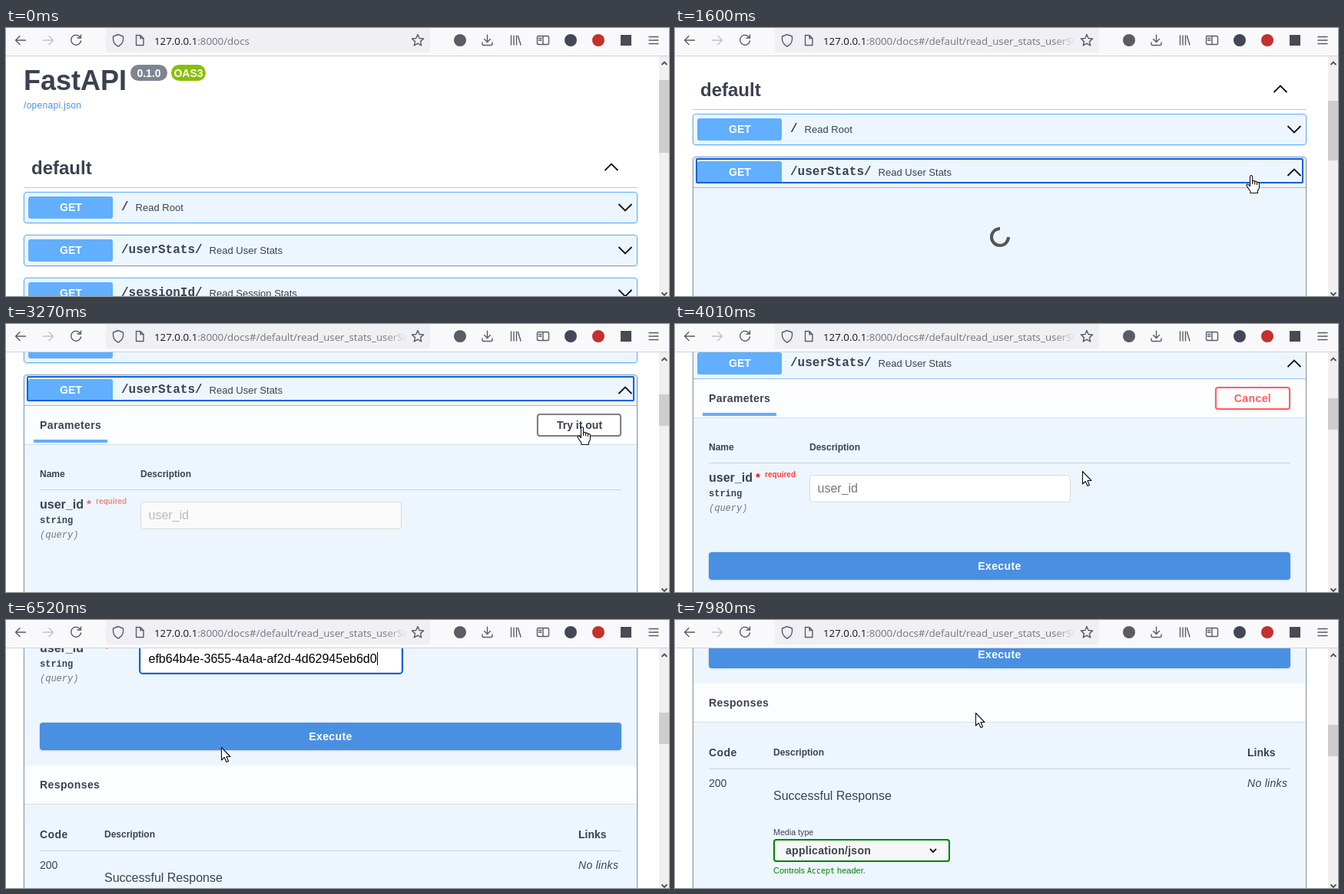
Animation, 863 px wide and 350 px high, one loop 8 s. Source, as an HTML page:

```html
<!DOCTYPE html>
<html lang="en">
<head>
<meta charset="utf-8">
<title>API docs walkthrough</title>
<style>
html, body { margin: 0; width: 100%; height: 100%; overflow: hidden; background: #fff }
svg { display: block }
text { font-family: "Liberation Sans", Arial, sans-serif; fill: #3b4151 }
.b { font-weight: bold }
.i { font-style: italic }
.m { font-family: "Liberation Mono", monospace }
.mid { text-anchor: middle }
.wide { letter-spacing: .4px }
.url { font-family: "Open Sans", sans-serif; fill: #15141a }
.line { fill: none; stroke: #5b5b66; stroke-width: 1.4; stroke-linecap: round; stroke-linejoin: round }
.chev { fill: none; stroke: #111; stroke-width: 1.8 }
.ring { fill: none; stroke: #0060df; stroke-width: 2 }
</style>
</head>
<body>
<svg id="stage" width="863" height="350" viewBox="0 0 863 350"></svg>
<script>
const rect = (x, y, w, h, fill, more = '') =>
  `<rect x="${x}" y="${y}" width="${w}" height="${h}" fill="${fill}" ${more}/>`;
const text = (x, y, size, cls, str, more = '') =>
  `<text x="${x}" y="${y}" font-size="${size}" class="${cls}" ${more}>${str}</text>`;
const group = (id, body) => `<g id="${id}">${body}</g>`;
const path = (d, cls = 'line', more = '') => `<path d="${d}" class="${cls}" ${more}/>`;
const chevron = (x, y, dir, id = '') =>
  path(`M${x - 8.5} ${y - 4 * dir}l8.5 ${8.5 * dir}l8.5 ${-8.5 * dir}`, 'chev', id && `id="${id}"`);
const shadow = 'filter="url(#soft)"';

const frame = (y, h, stroke, id = '') =>
  rect(23.5, y + .5, 798, h - 1, '#edf6fe', `rx="3.5" stroke="${stroke}" ${shadow} ${id}`);
const label = (y, route, note) =>
  rect(29, y + 6, 110, 29, '#61affe', 'rx="3"') +
  text(84.5, y + 25, 14, 'b mid', 'GET', 'style="fill:#fff"') +
  text(150, y + 24, 16, 'b m', route) +
  text(159 + route.length * 9.6, y + 25, 13, '', note);
const closed = (y, route, note) =>
  frame(y, 41, '#61affe') + label(y, route, note) + chevron(806, y + 20, 1);
const section = y =>
  rect(24, y, 797, 50, '#fcfdff') + rect(24, y + 50, 797, 1, '#d3dfea');
const rule = y => rect(44, y, 757, 1, '#c9d3df');

const intro =
  text(23, 81, 36, 'b', 'FastAPI') +
  rect(162, 48, 48, 21, '#7d8492', 'rx="10.5"') +
  text(186, 64, 14, 'b mid', '0.1.0', 'style="fill:#fff"') +
  rect(215, 48, 45, 21, '#89bf04', 'rx="10.5"') +
  text(237.5, 64, 14, 'b mid', 'OAS3', 'style="fill:#fff"') +
  text(23, 105, 12, '', '/openapi.json', 'style="fill:#4990e2;letter-spacing:.3px"') +
  text(33, 191, 24, 'b', 'default') + chevron(788, 182, -1) +
  rect(23, 208, 799, 1, '#c4c6cb') +
  closed(214, '/', 'Read Root');

const otherBlocks =
  closed(326, '/sessionId/', 'Read Session Stats') +
  closed(382, '/stats/', 'Read Stats') +
  closed(438, '/session/', 'Read Session');

const parameters =
  section(311) +
  text(44, 341, 14, 'b wide', 'Parameters') + rect(36, 355, 96, 4, '#61affe') +
  group('tryBtn', rect(692, 322, 108, 28, '#fff', `rx="3" stroke="#808080" stroke-width="2" ${shadow}`) +
    text(746.5, 341, 14, 'b mid', 'Try it out')) +
  group('cancelBtn', rect(704, 322, 96, 28, '#fcfdff', `rx="3" stroke="#ff6060" stroke-width="2" ${shadow}`) +
    text(752, 341, 14, 'b mid wide', 'Cancel', 'style="fill:#ff6060"')) +
  text(44, 404, 12, 'b', 'Name') + text(175, 404, 12, 'b', 'Description') + rule(420) +
  text(44, 445, 16, 'b', 'user_id') +
  group('required', text(105, 444, 15, 'b', '*', 'style="fill:#f00"') +
    text(117, 439, 10, 'b', 'required', 'style="fill:#f44336"')) +
  text(44, 464, 12, 'b m', 'string') +
  text(44, 483, 12, 'i m', '(query)', 'style="fill:#777"') +
  rect(175.5, 436.5, 339, 35, '#fff', 'id="input" rx="4" stroke="#d9d9d9"') +
  rect(174, 435, 342, 38, 'none', 'id="inputRing" class="ring" rx="4"') +
  text(185.5, 459, 16, '', 'user_id', 'id="value"') +
  rect(186, 445, 1, 17, '#000', 'id="caret"');

const responses =
  rect(44, 537, 757, 36, '#4990e2', `rx="4" ${shadow}`) +
  text(422.5, 560, 14, 'b mid wide', 'Execute', 'style="fill:#fff"') +
  section(593) + text(44, 623, 14, 'b wide', 'Responses') +
  text(44, 688, 14, 'b wide', 'Code') + text(128, 687, 12, 'b', 'Description') +
  text(745, 688, 14, 'b', 'Links') + rule(704) +
  text(44, 728, 14, '', '200') + text(128, 745, 16, '', 'Successful Response') +
  text(745, 728, 14, 'i', 'No links', 'style="letter-spacing:.3px"') +
  text(128, 791, 10.7, '', 'Media type') +
  rect(129, 797, 228, 28, '#f7f7f7', 'rx="3" stroke="#008000" stroke-width="2"') +
  text(144, 816, 14, 'b', 'application/json', 'style="letter-spacing:.28px"') +
  path('M332 809l4 4l4 -4', 'chev') +
  `<text x="128" y="841" font-size="11" style="fill:#008000">Controls <tspan
    font-family="Noto Sans Mono, monospace" font-size="10">Accept</tspan> header.</text>`;

const page = intro +
  frame(270, 41, '#61affe', 'id="shut"') + frame(270, 900, '#8499ab', 'id="open"') +
  group('openLine', rect(24, 310, 797, 1, '#8fbfe9')) +
  label(270, '/userStats/', 'Read User Stats') +
  chevron(806, 290, 1, 'chevDown') + chevron(806, 291, -1, 'chevUp') +
  rect(28, 273, 789, 31, 'none', 'id="headRing" class="ring" rx="1"') +
  group('others', otherBlocks) +
  path('M423 364A11 11 0 1 0 434 375', '', 'id="spinner" fill="none" stroke="#555" stroke-width="4"') +
  group('params', parameters) + group('results', responses);

const dot = (x, fill) => `<circle cx="${x}" cy="16" r="8" fill="${fill}"/>`;
const star = Array.from({ length: 10 }, (_, k) => {
  const r = k % 2 ? 3.7 : 8, a = k * Math.PI / 5;
  return `${536 + r * Math.sin(a)} ${16.5 - r * Math.cos(a)}`;
}).join('L');

const toolbar =
  rect(0, 0, 863, 37, '#f9f9fb') + rect(0, 36, 863, 1, '#d0d0d6') +
  rect(130, -4, 422, 36, '#f0f0f4', 'rx="4"') +
  path('M25.500 16H12.500M18 10.500L12.500 16L18 21.500') +
  path('M48.500 16H61.500M56 10.500L61.500 16L56 21.500', 'line', 'opacity=".35"') +
  path('M96.500 12A6.500 6.500 0 1 0 97.500 17M97.500 9V13H93') +
  path('M146 8.500L152.500 11V15Q152 21 146 24Q140 21 139.500 15V11Z') +
  path('M169.500 9.500H175L179 13.500V22.500H169.500ZM175 9.500V13.500H179') +
  `<svg x="193" y="0" width="331" height="34"><text x="0" y="21.500" font-size="13.300"
    class="url">127.0.0.1<tspan id="route" fill="#73737c"></tspan></text></svg>` +
  rect(494, 2, 31, 28, 'url(#fade)') +
  path(`M${star}Z`) +
  dot(591, '#5b5b66') +
  path('M626.500 9V18M622.500 14.500L626.500 18.500L630.500 14.500M620 19V20.500Q620 22.500 622 22.500H631Q633 22.500 633 20.500V19') +
  path('M657.500 10V22M661 10V22M664.500 10V22M666.500 10.500L670 22') +
  path('M693 10.500H705Q706.500 10.500 706.500 12V20Q706.500 21.500 705 21.500H693.500Q691.500 21.500 691.500 20V12Q691.500 10.500 693 10.500M699 10.500V21.500M693.500 13.500H697M693.500 16H697') +
  dot(735, '#45455a') + dot(771, '#c4302b') +
  rect(800, 9, 14, 14, '#4a4a55') +
  path('M837 11.500H849M837 16H849M837 20.500H849');

const scrollbar =
  rect(850, 37, 13, 313, '#f0f0f0') + rect(850, 68, 13, 95, '#cdcdcd', 'id="thumb"') +
  path('M853.500 48L857 44.500L860.500 48M853.500 345.500L857 349L860.500 345.500', 'chev', 'style="stroke:#505050"');

const cursorStyle = 'fill="#fff" stroke="#111" stroke-width="1.1" stroke-linejoin="round"';
const cursors =
  path('M.5 .5V17L4.200 13.500L7 19.500L9.500 18.500L7 12.500H12Z', '', `id="arrow" ${cursorStyle}`) +
  path('M-1.500 1.500Q0 -.5 1.500 1.500V8Q3.500 6.500 4.700 8.500Q6.500 7.500 7.500 9.500Q10 9 10.500 11V16Q10 19 8.500 20.500V23.500H-1V21Q-4 17.500 -6 13.500Q-5.500 11 -3.500 12.500L-1.500 14.500ZM1.500 8V12M4.700 9V12.500M7.500 10V13',
    '', `id="hand" ${cursorStyle}`) +
  path('M-3 -6.500H-1L0 -5.500L1 -6.500H3M0 -5.500V6M-3 7H-1L0 6L1 7H3', '', 'id="beam" fill="none" stroke="#111"');

const stage = document.getElementById('stage');
stage.innerHTML = `<defs>
  <filter id="soft" x="-5%" y="-20%" width="110%" height="140%"><feDropShadow dx="0" dy="0.500" stdDeviation="1" flood-opacity=".19"/></filter>
  <linearGradient id="fade"><stop stop-color="#f0f0f4" stop-opacity="0"/><stop offset=".9" stop-color="#f0f0f4"/></linearGradient>
  </defs>` + rect(0, 0, 863, 350, '#fff') +
  group('page', page) + scrollbar + toolbar + group('cursor', cursors);

const el = {};
stage.querySelectorAll('[id]').forEach(n => el[n.id] = n);
const show = (id, on) => el[id].style.display = on ? '' : 'none';
const set = (id, attrs) => Object.entries(attrs).forEach(([k, v]) => el[id].setAttribute(k, v));
const clamp = x => Math.min(1, Math.max(0, x));
const ease = x => x * x * (3 - 2 * x);

// Each wheel notch scrolls the page by 102 px: [start, duration]
const notches = [[790, 220], [2010, 280], [3900, 280], [6280, 280], [7700, 275]];
const scrollAt = t => notches.reduce((s, [t0, d]) => s + 102 * ease(clamp((t - t0) / d)), 0);

// Pointer stops: [time, x, y]
const stops = [[70, 828, 340], [610, 750, 192], [1870, 750, 192], [2000, 746, 198], [2300, 746, 198],
  [2660, 750, 144], [2860, 750, 134], [3450, 750, 134], [3900, 530, 192], [4010, 530, 192],
  [4210, 504, 186], [4560, 290, 160], [4800, 280, 159], [6120, 280, 159], [6250, 280, 166],
  [6590, 280, 166], [6860, 374, 145], [7450, 374, 145], [7580, 376, 141], [7720, 376, 141],
  [7900, 391, 121], [8000, 391, 121]];
const shapes = [[0, 'arrow'], [130, 'hand'], [3480, 'arrow'], [4400, 'beam'],
  [6400, 'arrow'], [6650, 'hand'], [7800, 'arrow']];

function pointerAt(t) {
  const n = Math.max(1, stops.findIndex(p => p[0] > t));
  const [t0, x0, y0] = stops[n - 1], [t1, x1, y1] = stops[n];
  const k = ease(clamp((t - t0) / (t1 - t0)));
  return [x0 + (x1 - x0) * k, y0 + (y1 - y0) * k].map(Math.round);
}
const within = (t, spans) => spans.some(([a, b]) => t >= a && t < b);

function draw(t) {
  const s = scrollAt(t);
  const opened = t >= 1540, loaded = t >= 1670, editing = t >= 3410, focused = t >= 4560, filled = t >= 5460;
  set('page', { transform: `translate(0 ${-Math.round(s)})` });
  const [y, h] = loaded ? [61.7 + .1476 * s, 41] : opened ? [95, 78] : [68 + .29 * s, 95];
  set('thumb', { y: Math.round(y), height: h });
  el.route.textContent = ':8000/docs' + (opened ? '#/default/read_user_stats_userStats__get' : '');

  for (const id of ['shut', 'chevDown', 'others']) show(id, !opened);
  for (const id of ['open', 'openLine', 'chevUp']) show(id, opened);
  show('headRing', t >= 1470 && !editing);
  show('spinner', opened && !loaded);
  set('spinner', { transform: `rotate(${(t - 1600) * .36} 423 375)` });
  show('params', loaded);
  show('results', editing);
  show('tryBtn', !editing);
  show('cancelBtn', editing);
  set('required', { opacity: editing ? 1 : .6 });

  set('input', { fill: editing ? '#fff' : '#fafafa' });
  show('inputRing', focused);
  el.value.textContent = filled ? 'efb64b4e-3655-4a4a-af2d-4d62945eb6d0' : 'user_id';
  el.value.style.fill = filled ? '#000' : editing ? '#757575' : '#b9bbbd';
  set('caret', { x: filled ? 483 : 186 });
  show('caret', within(t, [[4560, 5060], [5460, 5590], [6120, 6720], [7250, 7750]]));

  const shape = shapes.filter(p => p[0] <= t).pop()[1];
  for (const id of ['arrow', 'hand', 'beam']) show(id, id === shape);
  show('cursor', t >= 70);
  set('cursor', { transform: `translate(${pointerAt(t)})` });
}

function tick() {
  draw(performance.now() % 8000);
  requestAnimationFrame(tick);
}
tick();
</script>
</body>
</html>
```
